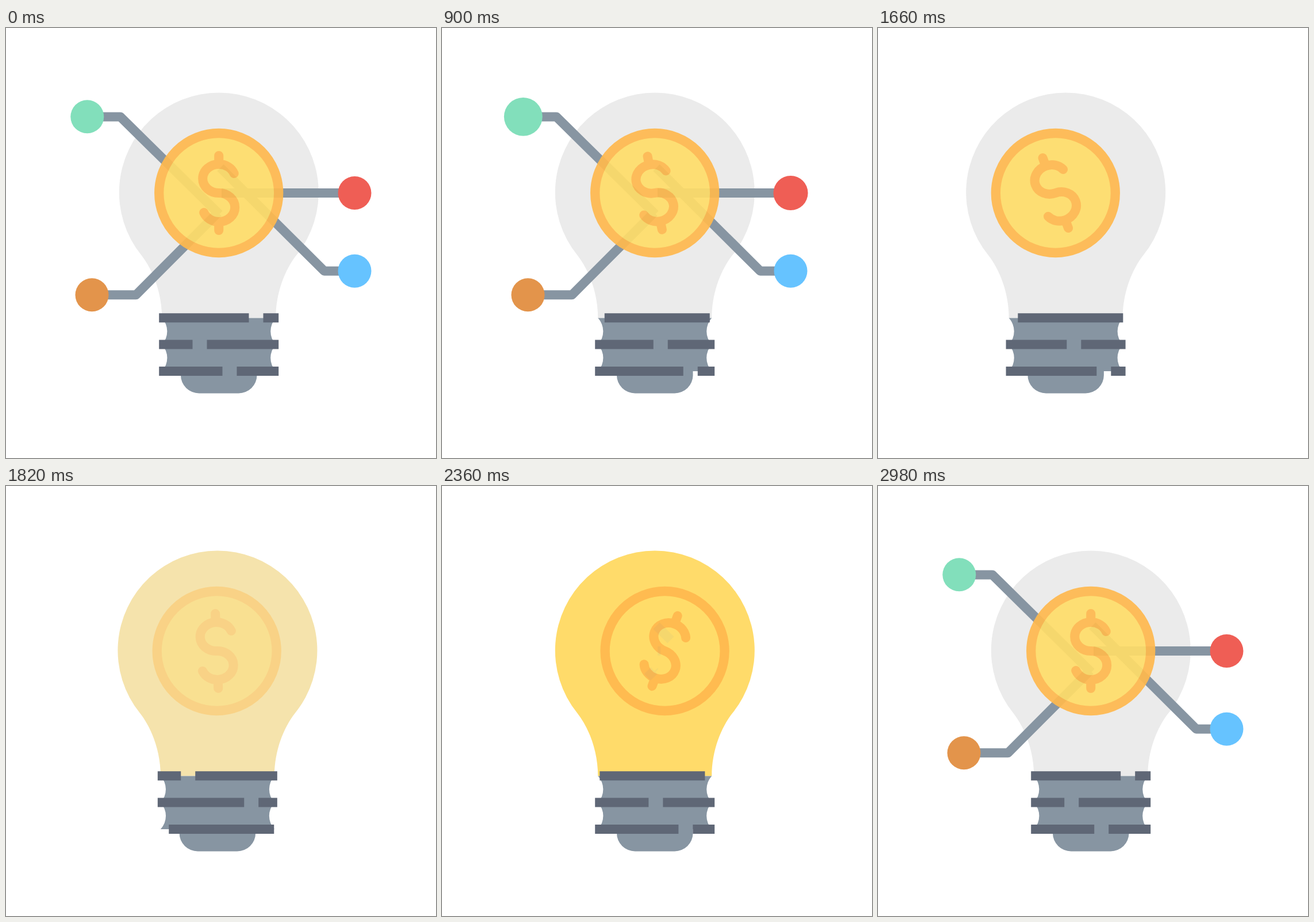
An HTML page that plays this animation: 748x748 px, repeating every 3 s.

```html
<!DOCTYPE html>
<html lang="en">
<head>
<meta charset="utf-8">
<title>Bright idea</title>
<style>
  html, body { margin: 0; width: 100%; height: 100%; overflow: hidden; background: #fff; }
  svg { display: block; width: 100vw; height: 100vh; }
  #wires path { fill: none; stroke: #8795a2; stroke-width: 16; stroke-linejoin: round; }
  #bars line { stroke: #5f6776; stroke-width: 16; stroke-dasharray: 183 25; }
  #dollar { fill: none; stroke: #ffb94e; stroke-width: 16; stroke-linecap: round; }
</style>
</head>
<body>
<svg viewBox="0 0 748 748">
  <g id="lamp">
    <path id="glass" d="M271.3 504.5C271.3 460 255 420 235.3 395A173.5 173.5 0 1 1 505.3 395C485.6 420 469.3 460 469.3 504.5Z"/>
    <path fill="#8795a2" d="M271.3 504.5A34 34 0 0 1 271.3 550.7A34 34 0 0 1 271.3 597H304V604A32 31.5 0 0 0 336 635.5H404.5A32 31.5 0 0 0 436.5 604V597H469.3A34 34 0 0 1 469.3 550.7A34 34 0 0 1 469.3 504.5Z"/>
    <g id="bars">
      <line x1="266.2" x2="474.2" y1="504.2" y2="504.2"/>
      <line x1="266.2" x2="474.2" y1="550.4" y2="550.4"/>
      <line x1="266.2" x2="474.2" y1="596.9" y2="596.9"/>
    </g>
  </g>
  <g id="wires"></g>
  <g id="coin">
    <circle r="104" fill="#ffdd69" stroke="#ffb94e" stroke-width="16.3"/>
    <path id="dollar" d="M26.5-34A28 25 0 0 0 0-50A28 25 0 0 0 0 0A28 25 0 0 1 0 50A28 25 0 0 1-26 34M0-65V-50M0 50V65"/>
  </g>
  <g id="nodes"></g>
</svg>
<script>
const $ = id => document.getElementById(id);
const END = 2980, LOOP = 3000;

// wire path from the middle outwards, node centre, colour,
// start of the node's exit and entry, start of the wire's exit and entry
const links = [
  ['M371 324L199 154.5H142', 141.3, 154.3, '#82dfbb', 810, 2592, 1100, 2346],
  ['M375 287H606', 606.5, 287, '#ef5e55', 862, 2540, 1135, 2335],
  ['M373 243L553.5 422.7H606', 606.5, 422.7, '#66c3ff', 914, 2488, 1170, 2300],
  ['M369 321L226 464.3H150', 149.5, 464.3, '#e3944b', 966, 2436, 1205, 2318]
];
const POP = 180, DRAW = 290;

function add(parent, tag, attrs) {
  const el = document.createElementNS('http://www.w3.org/2000/svg', tag);
  for (const name in attrs) el.setAttribute(name, attrs[name]);
  return $(parent).appendChild(el);
}

// eased value through a flat list of time, value pairs
function track(t, ...keys) {
  if (t <= keys[0]) return keys[1];
  for (let i = 2; i < keys.length; i += 2) {
    if (t < keys[i]) {
      const u = (t - keys[i - 2]) / (keys[i] - keys[i - 2]);
      return keys[i - 1] + (keys[i + 1] - keys[i - 1]) * u * u * (3 - 2 * u);
    }
  }
  return keys[keys.length - 1];
}

const parts = links.map(([d, cx, cy, fill, out, back, wireOut, wireBack]) => ({
  wire: add('wires', 'path', { d, pathLength: 1 }),
  node: add('nodes', 'circle', { cx, cy, fill }),
  out, back, wireOut, wireBack
}));
const bars = [...$('bars').children];
const barOffsets = [27, 125, 73];

function draw(t) {
  const shift = track(t, 1333, 0, 1655, -43.7, 2000, 43.9, 2345, 0);
  $('lamp').setAttribute('transform', `translate(${shift})`);
  const lit = track(t, 1667, 0, 1980, 1, 2365, 1, 2680, 0);
  const mix = (a, b) => Math.round(a + (b - a) * lit);
  $('glass').setAttribute('fill', `rgb(${mix(235, 255)},${mix(235, 219)},${mix(235, 106)})`);
  bars.forEach((bar, i) => {
    bar.style.strokeDashoffset = barOffsets[i] + 832 * (1 - t / END);
  });

  const pulse = track(t, 0, 0, 333, 1, 667, 0);
  const slide = shift + track(t, 1333, 0, 1655, -17.8, 2000, 17.5, 2345, 17.5, 2680, 0);
  const turn = track(t, 667, 0, 1100, -20, 1667, -20, 2000, 20, 2345, 20, 2680, 0);
  const grow = 1 + 0.2 * pulse;
  $('coin').setAttribute('transform', `translate(${370.2 + slide} 287) scale(${grow})`);
  $('coin').setAttribute('opacity', track(t, 1667, 0.92, 1950, 0, 2010, 0, 2345, 0.92));
  $('dollar').setAttribute('transform', `rotate(${turn}) scale(${(1 + 0.071 * pulse) / grow})`);

  for (const { wire, node, out, back, wireOut, wireBack } of parts) {
    const size = track(t, out, 1, out + POP, 1.3, out + 2 * POP, 0,
      back, 0, back + POP, 1.3, back + 2 * POP, 1);
    node.setAttribute('r', 29 * size);
    const length = track(t, wireOut, 1, wireOut + DRAW, 0, wireBack, 0, wireBack + DRAW, 1);
    wire.style.display = length > 0 ? '' : 'none';
    wire.style.strokeDasharray = `${length} 2`;
  }
}

function frame() {
  draw(Math.min(performance.now() % LOOP, END));
  requestAnimationFrame(frame);
}
frame();
</script>
</body>
</html>
```
